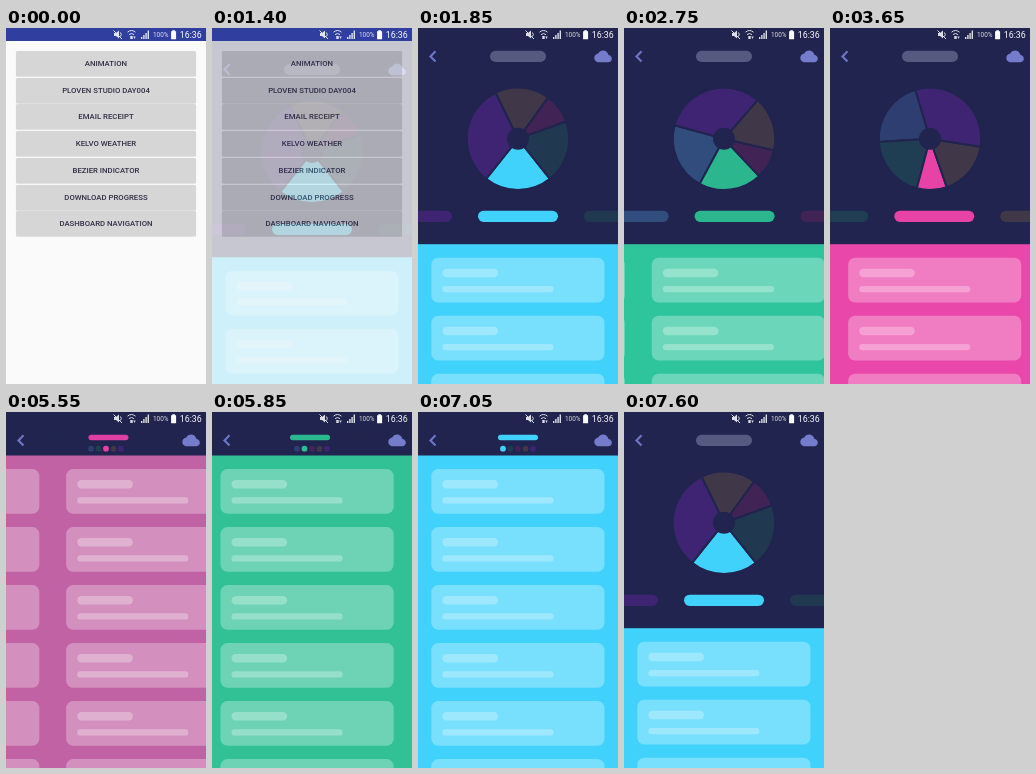
An HTML page with a canvas that plays this animation: 200x356 px, repeating every 8000 ms.

```html
<!DOCTYPE html>
<html lang="en">
<head>
<meta charset="utf-8">
<title>Dashboard navigation</title>
<style>
  html, body { margin: 0; width: 100%; height: 100%; overflow: hidden; background: #fafafa; }
  #menu, canvas, svg { position: absolute; left: 0; top: 0; width: 200px; height: 356px; }
  #menu { background: linear-gradient(#303f9f 13.4px, #fafafa 13.4px); }
  #menu div {
    position: absolute; left: 9.7px; width: 180.6px; height: 25px;
    border-radius: 1.5px; background: #d6d6d6; box-shadow: 0 .5px .8px #0003;
    font: 500 7.78px/26px Roboto, sans-serif; color: #302e46; text-align: center;
  }
  svg text { font-family: Roboto, sans-serif; }
</style>
</head>
<body>
<div id="menu"></div>
<canvas id="dash"></canvas>
<svg viewBox="0 0 200 356" fill="#fff">
  <g opacity=".85">
    <path d="M108 5h2l3-2.5v8L110 8h-2z"/>
    <path d="M107.5 2.5l8.5 8.5M114.5 4.5q1.5 2 0 4" fill="none" stroke="#fff"/>
    <path d="M121.5 4.2q4-3.4 8 0M123 6.6q2.5-2.1 5 0" fill="none" stroke="#fff"/>
    <path d="M124.3 8h2.4v3h-2.4zM127.3 8.5h2.4l-1.2 2.5z"/>
    <path d="M135 9h1.4v2H135zM137.2 7h1.4v4h-1.4zM139.4 5h1.4v6h-1.4zM141.6 2.5h1.4V11h-1.4z"/>
    <text x="147" y="9.4" font-size="6.4">100%</text>
  </g>
  <path d="M166.3 2.2h2.6v1h1.2v8h-5v-8h1.2z"/>
  <text x="173.8" y="10.1" font-size="8.8">16:36</text>
</svg>
<script>
const LOOP = 8000, BG = [32, 36, 78];
const FULL = [[65, 210, 252], [44, 196, 148], [238, 68, 170], [180, 130, 60], [120, 40, 190]];
const DIM = [[46, 62, 112], [32, 56, 80], [65, 35, 85], [64, 56, 72], [62, 36, 115]];
const SWEEP = [77, 71.5, 34, 62, 115.5];
const TURN = [0, 74.25, 127];   // pie rotation that puts each page's slice at the bottom
const CLOUD = new Path2D('M19.4 10C18.7 6.6 15.6 4 12 4 9.1 4 6.6 5.6 5.4 8 2.3 8.4 0 10.9 0 14' +
  'c0 3.3 2.7 6 6 6h13c2.8 0 5-2.2 5-5 0-2.6-2-4.8-4.6-5z');

const menu = document.getElementById('menu'), dash = document.getElementById('dash');
['ANIMATION', 'PLOVEN STUDIO DAY004', 'EMAIL RECEIPT', 'KELVO WEATHER',
  'BEZIER INDICATOR', 'DOWNLOAD PROGRESS', 'DASHBOARD NAVIGATION'].forEach((label, i) => {
  const button = document.createElement('div');
  button.textContent = label;
  button.style.top = 23 + i * 26.7 + 'px';
  menu.append(button);
});

const dpr = window.devicePixelRatio || 1;
dash.width = 200 * dpr;
dash.height = 356 * dpr;
const g = dash.getContext('2d');
g.scale(dpr, dpr);

const clamp = x => Math.min(1, Math.max(0, x));
const lerp = (a, b, k) => a + (b - a) * k;
const mix = (a, b, k) => a.map((v, i) => lerp(v, b[i], k));
const css = c => `rgb(${c.map(Math.round)})`;
const ease = (t, start, length) => 1 - (1 - clamp((t - start) / length)) ** 5;
const rad = deg => deg * Math.PI / 180;

const pageAt = t => ease(t, 2475, 675) + ease(t, 3375, 525) - ease(t, 5518, 635) - ease(t, 6475, 575);
const openAt = t => 1 - ease(t, 4370, 450) + ease(t, 7275, 325);

function between(list, pos, blend) {
  const i = Math.min(Math.floor(pos), list.length - 2);
  return blend(list[i], list[i + 1], pos - i);
}

function pill(x, y, w, h, color, r = h / 2) {
  g.fillStyle = color;
  g.beginPath();
  g.roundRect(x, y, w, h, r);
  g.fill();
}

function disc(x, y, r, color) {
  g.fillStyle = color;
  g.beginPath();
  g.arc(x, y, r, 0, 7);
  g.fill();
}

// Signed distance of item i from the current page, wrapping around
const distance = (i, pos) => ((i - pos + 7.5) % 5) - 2.5;
const tint = (i, pos) => css(mix(DIM[i], FULL[i], clamp(1 - Math.abs(distance(i, pos)))));

function drawCards(pos, top) {
  for (let page = 0; page < 5; page++) {
    const x = (page - pos) * 200;
    if (Math.abs(x) >= 200) continue;
    for (let y = top + 13.6; y < 356; y += 58) {
      pill(x + 13.3, y, 173.2, 44.7, '#ffffff4a', 7);
      pill(x + 24.4, y + 11, 55.6, 8.5, '#ffffff48');
      pill(x + 24.4, y + 28.1, 111.1, 6.4, '#ffffff48');
    }
  }
}

function drawPie(pos, open) {
  g.save();
  g.globalAlpha = open;
  g.translate(100, lerp(25, 110.8, open));
  g.scale(open, open);
  g.strokeStyle = css(BG);
  g.lineWidth = 2;
  let end = 128.5 + between(TURN, pos, lerp);
  SWEEP.forEach((sweep, i) => {
    g.fillStyle = tint(i, pos);
    g.beginPath();
    g.moveTo(0, 0);
    g.arc(0, 0, 51.2, rad(end - sweep), rad(end));
    g.closePath();
    g.fill();
    g.stroke();
    end -= sweep;
  });
  disc(0, 0, 11, css(BG));
  g.restore();
}

function drawHeader(pos, open, bottom) {
  g.fillStyle = css(BG);
  g.fillRect(0, 0, 200, bottom);
  g.save();
  g.beginPath();
  g.rect(0, 0, 200, bottom);
  g.clip();
  if (open > 0) {
    drawPie(pos, open);
    g.globalAlpha = Math.sqrt(open);
    const s = lerp(.7, 1, open);
    pill(100 - 28 * s, 28.4 - 5.6 * s, 56 * s, 11.2 * s, '#575a80');
  }

  const scale = lerp(.5, 1, open), barY = lerp(25.5, 188.3, open);
  for (let i = 0; i < 5; i++) {
    const d = distance(i, pos);
    g.globalAlpha = lerp(clamp(1 - Math.abs(d)), 1, open);
    pill(100 + (d * 106 - 40) * scale, barY - 5.6 * scale, 80 * scale, 11.2 * scale, tint(i, pos));
  }

  g.globalAlpha = clamp(1 - open * 36);
  for (let i = 0; i < 5; i++) disc(85 + 7.5 * i, 36.7, 2.9, tint(i, pos));
  g.restore();

  g.strokeStyle = '#6c74c4';
  g.lineWidth = 2.2;
  g.beginPath();
  g.moveTo(17.5, 23.3);
  g.lineTo(12.5, 28.4);
  g.lineTo(17.5, 33.5);
  g.stroke();

  g.save();
  g.translate(176.3, 19.7);
  g.scale(.73, .73);
  g.fillStyle = '#757ccb';
  g.fill(CLOUD);
  g.restore();
}

function frame(now) {
  const t = now % LOOP;
  dash.style.opacity = clamp((t - 1330) / 300);
  dash.style.transform = `translateY(${(1 - ease(t, 1330, 500)) * 28}px)`;

  const pos = pageAt(t), open = clamp(openAt(t)), bottom = lerp(43.5, 216.2, open);
  g.fillStyle = css(between(FULL, pos, mix));
  g.fillRect(0, 0, 200, 356);
  drawCards(pos, bottom);
  drawHeader(pageAt(t - 27), open, bottom);   // the header trails the pages slightly
  requestAnimationFrame(frame);
}
requestAnimationFrame(frame);
</script>
</body>
</html>
```
